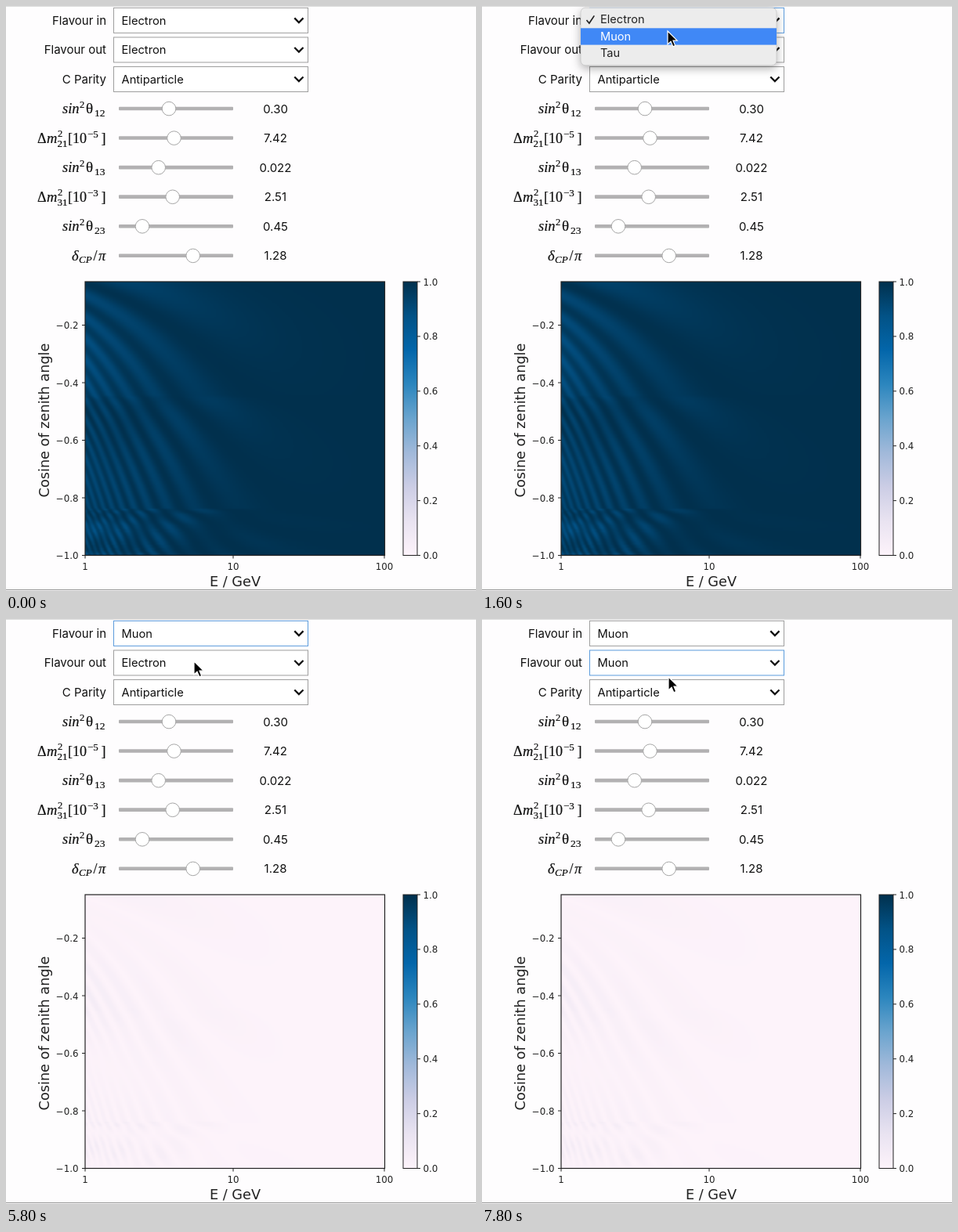
Recreate the animation shown at these times as an HTML page with a canvas. Size 600x747 px, loop 8000 ms.

```html
<!DOCTYPE html>
<html lang="en">
<head>
<meta charset="utf-8">
<title>Oscillation explorer</title>
<style>
  html, body { margin: 0; width: 100%; height: 100%; overflow: hidden; background: #fefdfe; }
  canvas { position: absolute; left: 101px; top: 352px; width: 382px; height: 350px; }
  svg { position: absolute; left: 0; top: 0; }
  .ui { font: 15px Inter, "Liberation Sans", sans-serif; fill: #111; }
  .plot { font: 11.8px "DejaVu Sans", sans-serif; fill: #222; }
  .title { font-size: 17.7px; }
  .math { font-family: "Liberation Serif", "Noto Serif", serif; fill: #111; stroke: #111; stroke-width: .2; }
</style>
</head>
<body>
<canvas id="survive"></canvas>
<canvas id="appear"></canvas>
<svg id="stage" width="600" height="747" viewBox="0 0 600 747"></svg>
<script>
const LOOP = 8000;
const FLAVOURS = ['Electron', 'Muon', 'Tau'];
const stage = document.getElementById('stage');
const rowY = i => 18.4 + 37.56 * i;

function add(tag, attrs, parent = stage, text) {
  const el = document.createElementNS('http://www.w3.org/2000/svg', tag);
  for (const key in attrs) el.setAttribute(key, attrs[key]);
  if (text !== undefined) el.textContent = text;
  parent.appendChild(el);
  return el;
}
const label = (text, x, y, anchor, cls, more) =>
  add('text', { x, y, 'text-anchor': anchor, class: cls, ...more }, stage, text);
const line = (d, stroke = '#222', width = 1) =>
  add('path', { d, stroke, 'stroke-width': width, fill: 'none' });

// Colour scale
const SCALE = [[253, 243, 250], [233, 227, 241], [204, 205, 229], [161, 185, 218],
  [106, 164, 206], [44, 134, 190], [3, 102, 170], [2, 82, 134], [1, 48, 77]];

function colour(p) {
  const v = Math.min(Math.max(p, 0), 1) * 8;
  const i = Math.min(Math.floor(v), 7);
  return SCALE[i].map((c, k) => c + (SCALE[i + 1][k] - c) * (v - i));
}

// Antineutrino oscillation through a layered Earth
const RADIUS = 6371, HEIGHT = 15, STEPS = 96;
const mix = s2 => [Math.sqrt(s2), Math.sqrt(1 - s2)];
const [s12, c12] = mix(0.30), [s13, c13] = mix(0.022), [s23, c23] = mix(0.45);
const DELTA = 1.28 * Math.PI;
const rowE = [c12 * c13, s12 * c13, s13];
const row2 = [-s12, c12, 0];
const row3 = [-c12 * s13, -s12 * s13, c13];

function electronDensity(r) {
  if (r > RADIUS) return 0;
  if (r > 5701) return 3.5 * 0.494;
  if (r > 3480) return 5 * 0.494;
  return (r > 1221 ? 11.2 : 13) * 0.466;
}

function project(row, re, im) {
  return [row[0] * re[0] + row[1] * re[1] + row[2] * re[2],
          row[0] * im[0] + row[1] * im[1] + row[2] * im[2]];
}

function propagate(energy, step, matter) {
  const re = rowE.slice(), im = [0, 0, 0];
  const k = 2.534 * step / energy;
  const phases = [0, k * 7.42e-5, k * 2.51e-3];
  const turn = share => {
    const cs = phases.map(p => Math.cos(p * share)), sn = phases.map(p => Math.sin(p * share));
    return () => {
      for (let j = 1; j < 3; j++) {
        const a = re[j], b = im[j];
        re[j] = a * cs[j] + b * sn[j];
        im[j] = b * cs[j] - a * sn[j];
      }
    };
  };
  const half = turn(0.5), full = turn(1);
  half();
  matter.forEach(([mr, mi], i) => {
    if (i) full();
    const [a, b] = project(rowE, re, im);
    const x = a * mr - b * mi, y = a * mi + b * mr;
    for (let j = 0; j < 3; j++) {
      re[j] += rowE[j] * x;
      im[j] += rowE[j] * y;
    }
  });
  half();
  const e = project(rowE, re, im), m = project(row2, re, im), t = project(row3, re, im);
  const cd = s23 * Math.cos(DELTA), sd = s23 * Math.sin(DELTA);
  return [e[0] ** 2 + e[1] ** 2,
    (c23 * m[0] + cd * t[0] - sd * t[1]) ** 2 + (c23 * m[1] + cd * t[1] + sd * t[0]) ** 2];
}

function paintMaps() {
  const w = 191, h = 175;
  const maps = ['survive', 'appear'].map(id => {
    const canvas = document.getElementById(id);
    canvas.width = w;
    canvas.height = h;
    const ctx = canvas.getContext('2d');
    return { ctx, image: ctx.createImageData(w, h) };
  });
  for (let y = 0; y < h; y++) {
    const c = 0.05 + 0.95 * (y + 0.5) / h;
    const length = RADIUS * c + Math.sqrt((RADIUS * c) ** 2 + 2 * RADIUS * HEIGHT + HEIGHT ** 2);
    const step = length / STEPS;
    const matter = Array.from({ length: STEPS }, (_, i) => {
      const s = (i + 0.5) * step;
      const r = Math.sqrt(RADIUS ** 2 + s * s - 2 * RADIUS * s * c);
      const v = 3.85e-4 * electronDensity(r) * step;
      return [Math.cos(v) - 1, Math.sin(v)];
    });
    for (let x = 0; x < w; x++) {
      const chances = propagate(100 ** ((x + 0.5) / w), step, matter);
      maps.forEach((map, k) => map.image.data.set([...colour(chances[k]), 255], 4 * (y * w + x)));
    }
  }
  maps.forEach(map => map.ctx.putImageData(map.image, 0, 0));
}

// Controls
function drawMath(y, parts) {
  for (const [text, x, dy, size, style = 'normal'] of parts)
    add('text', { x, y: y + dy, class: 'math', 'font-size': size, 'font-style': style }, stage, text);
}
const sinLabel = sub => [['sin', 72, 6, 18.5, 'italic'], ['2', 94, -1, 12.5],
  ['θ', 102, 6, 19], [sub, 113, 9.5, 13.5]];
const massLabel = (sub, power) => [['Δ', 40, 6, 18], ['m', 52, 6, 18.5, 'italic'],
  ['2', 66, -2, 12.5], [sub, 65.5, 11, 13], ['[10', 79, 6, 18], ['−' + power, 104, -0.5, 13], [']', 121.5, 6, 18]];

function drawSelect(i, name, value) {
  const y = rowY(i);
  label(name, 128, y + 5.4, 'end', 'ui');
  const box = add('rect', { x: 137.5, y: y - 16, width: 248, height: 32, fill: '#fff', stroke: '#9e9e9e' });
  const text = label(value, 147.5, y + 5.4, 'start', 'ui', { style: 'font-size:14.7px' });
  line(`M368.3 ${y - 3}l5.6 5.6l5.6 -5.6`, '#111', 2.3);
  return { box, text };
}

function drawSlider(i, parts, knob, value) {
  const y = rowY(i);
  drawMath(y, parts);
  add('rect', { x: 144, y: y - 2.4, width: 146, height: 4.6, rx: 1, fill: '#b2b1b2' });
  add('circle', { cx: knob, cy: y, r: 8.8, fill: '#fff', stroke: '#a6a6a6' });
  label(value, 344, y + 5.6, 'middle', 'ui');
}

line('M0 .5H600', '#dcdcdc');
line('M0 745.5H600', '#8f8f8f');
const selects = ['Flavour in', 'Flavour out', 'C Parity'].map((name, i) =>
  drawSelect(i, name, i < 2 ? 'Electron' : 'Antiparticle'));
[
  [sinLabel('12'), 208, '0.30'],
  [massLabel('21', 5), 214.5, '7.42'],
  [sinLabel('13'), 194.7, '0.022'],
  [massLabel('31', 3), 212.7, '2.51'],
  [sinLabel('23'), 174, '0.45'],
  [[['δ', 84, 6, 18.5, 'italic'], ['CP', 93, 9, 13, 'italic'], ['/', 111.5, 6, 18], ['π', 118, 6, 18.5, 'italic']], 238.7, '1.28']
].forEach((row, i) => drawSlider(i + 3, ...row));

// Plot frame and colour bar
const defs = add('defs', {});
const ramp = add('linearGradient', { id: 'ramp', x1: 0, y1: 1, x2: 0, y2: 0 }, defs);
SCALE.forEach((c, i) => add('stop', { offset: i / 8, 'stop-color': `rgb(${c})` }, ramp));
add('rect', { x: 101, y: 352, width: 382.5, height: 349.5, fill: 'none', stroke: '#222', 'stroke-width': 1.2 });
add('rect', { x: 507, y: 352, width: 18, height: 349.5, fill: 'url(#ramp)', stroke: '#222' });
for (let i = 1; i <= 5; i++) {
  const y = 334 + 73.5 * i;
  line(`M97 ${y}H101`);
  label('−' + (i / 5).toFixed(1), 92.5, y + 4.5, 'end', 'plot');
}
[[101, '1'], [290, '10'], [483, '100']].forEach(([x, text]) => {
  line(`M${x} 701.5V705.5`);
  label(text, x, 720, 'middle', 'plot');
});
for (let i = 0; i <= 5; i++) {
  const y = 701.5 - 69.9 * i;
  line(`M525 ${y}H529`);
  label((i / 5).toFixed(1), 532.5, y + 4.5, 'start', 'plot');
}
label('E / GeV', 292.5, 741, 'middle', 'plot title');
label('Cosine of zenith angle', 0, 0, 'middle', 'plot title', { transform: 'translate(54.5 529) rotate(-90)' });

// Pop-up list and pointer
const menu = add('g', {});
add('rect', { x: 126, y: 0, width: 250, height: 73.6, rx: 6, fill: '#ececec', stroke: '#c4c4c4', 'stroke-width': .7,
  style: 'filter:drop-shadow(0 4px 6px rgba(0,0,0,.3))' }, menu);
const bar = add('rect', { x: 126, width: 250, height: 21.3, fill: '#4088f6' }, menu);
const items = FLAVOURS.map((name, i) =>
  add('text', { x: 151, y: 20.2 + 21.3 * i, class: 'ui', style: 'font-size:14.6px' }, menu, name));
const tick = add('path', { fill: 'none', 'stroke-width': 1.7 }, menu);
const pointer = add('path', { d: 'M0 0V17L4 13.3L6.8 19.8L9.7 18.6L7 12.2H12.2Z',
  fill: '#000', stroke: '#fff', 'stroke-width': 1.2 });

// Each entry overrides what came before it
const poses = [
  { at: 0, tip: null, menu: -1, hover: 0, fade: 1, values: [0, 0], focus: -1, map: 0 },
  { at: 200, tip: [262, 80] },
  { at: 400, tip: [242, 30] },
  { at: 600, tip: [236, 15] },
  { at: 800, menu: 0, focus: 0 },
  { at: 1400, tip: [236, 20] },
  { at: 1600, tip: [237, 32], hover: 1 },
  { at: 1800, tip: [238, 38] },
  { at: 2200, fade: .5 },
  { at: 2400, menu: -1, values: [1, 0] },
  { at: 3000, tip: [238, 42] },
  { at: 3200, tip: [239, 46] },
  { at: 3400, tip: [240, 51] },
  { at: 3600, tip: [240, 54] },
  { at: 5800, map: 1 },
  { at: 6400, menu: 1, focus: 1, hover: 0, fade: 1 },
  { at: 6600, tip: [239, 64] },
  { at: 6800, tip: [238, 73], hover: 1 },
  { at: 7200, fade: .5 },
  { at: 7400, menu: -1 },
  { at: 7600, values: [1, 1] },
  { at: 7800, tip: [238, 74] }
];

const show = (el, on) => { el.style.visibility = on ? 'visible' : 'hidden'; };

function render(t) {
  const s = Object.assign({}, ...poses.filter(p => p.at <= t));
  selects.forEach(({ box, text }, i) => {
    box.setAttribute('stroke', s.focus === i ? '#5b9bdc' : '#9e9e9e');
    if (i < 2) text.textContent = FLAVOURS[s.values[i]];
  });
  show(document.getElementById('survive'), s.map === 0);
  show(document.getElementById('appear'), s.map === 1);

  show(menu, s.menu >= 0);
  if (s.menu >= 0) {
    const chosen = s.values[s.menu];
    const ink = i => i === s.hover ? '#fff' : '#222';
    menu.setAttribute('transform', `translate(0 ${2.2 + 37.6 * s.menu})`);
    menu.setAttribute('opacity', s.fade);
    bar.setAttribute('y', 4.8 + 21.3 * s.hover);
    items.forEach((item, i) => { item.style.fill = ink(i); });
    tick.setAttribute('d', `M133.5 ${15.8 + 21.3 * chosen}l3.4 4l6.4 -9.6`);
    tick.setAttribute('stroke', ink(chosen));
  }
  show(pointer, s.tip);
  if (s.tip) pointer.setAttribute('transform', `translate(${s.tip})`);
}

paintMaps();
const start = performance.now();
function frame() {
  render((performance.now() - start) % LOOP);
  requestAnimationFrame(frame);
}
frame();
</script>
</body>
</html>
```
